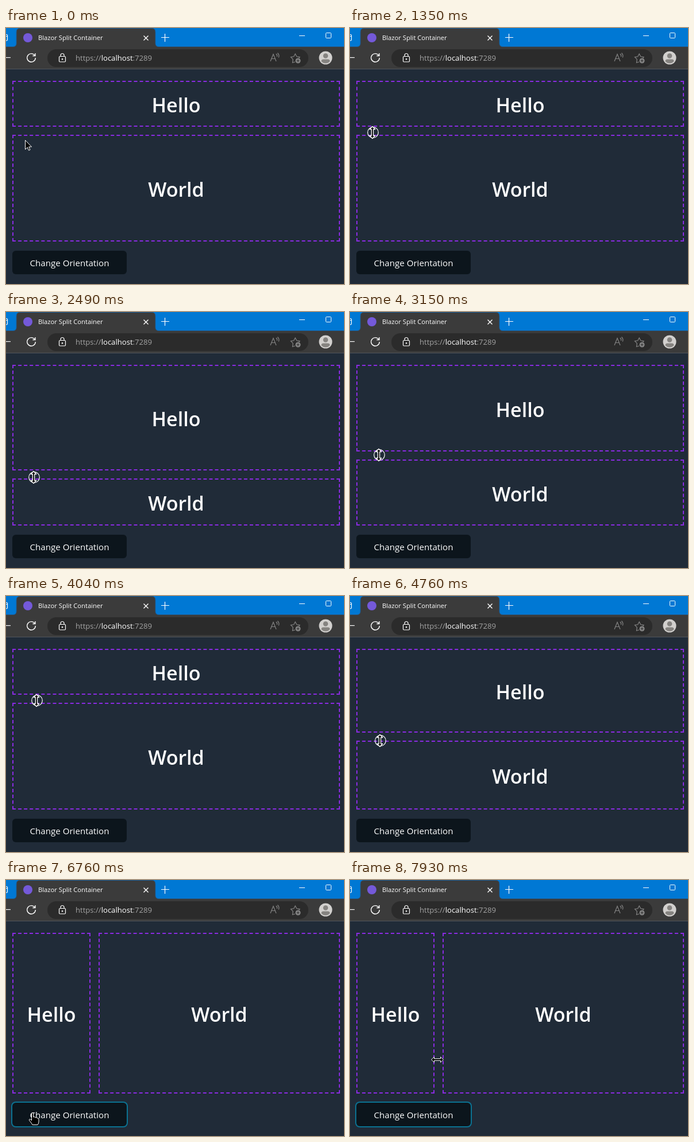
An HTML page that plays this animation: 588 by 446 pixels, repeating every 8 s.

```html
<!DOCTYPE html>
<html lang="en">
<head>
<meta charset="utf-8">
<title>Blazor Split Container</title>
<style>
  html, body { margin: 0; width: 100%; height: 100%; overflow: hidden; background: #202b38; }
  body { position: relative; font-family: "Open Sans", "Noto Sans", sans-serif; color: #fff; }
  svg { position: absolute; left: 0; top: 0; display: block; }
  .pane, #button { position: absolute; box-sizing: border-box; display: grid; place-items: center; line-height: 1; }
  .pane { border: 2px dashed blueviolet; padding-top: 4px; font-size: 34px; font-weight: 600; }
  #button {
    left: 11px; top: 388px; width: 199px; height: 41px; padding-top: 2px; border-radius: 6px;
    background: #0c151c; font-size: 15.1px; font-weight: 500; white-space: nowrap;
  }
</style>
</head>
<body>
<svg width="588" height="72" viewBox="0 0 588 72" fill="none">
  <rect width="588" height="34" fill="#0078d4"/>
  <rect y="33" width="588" height="39" fill="#3b3b3b"/>
  <path d="M-1 32.500H12Q18 32.500 18 27V7Q18 .5 24 .5H254Q260 .5 260 7V27Q260 32.500 266 32.500H589V34H-1Z" fill="#3b3b3b" stroke="#1c5f99"/>
  <rect y="33" width="588" height="2" fill="#3b3b3b"/>
  <path d="M0 71.500H588" stroke="#50565c"/>
  <rect x="72" y="37" width="454" height="31" rx="15.500" fill="#2b2b2b"/>
  <circle cx="38" cy="17" r="8" fill="#7459d9"/>
  <g stroke="#fff" stroke-width="1.2">
    <path d="M0 11.500H1Q2.500 11.500 2.500 13V20Q2.500 22 1 22H0M0 14.500H2"/>
    <path d="M239.500 13.500L247.500 21.500M247.500 13.500L239.500 21.500" stroke-width="1.4"/>
    <path d="M270 16.500H284M276.500 10V24"/>
    <path d="M510 13.500H520" stroke-width="1"/>
    <rect x="556.500" y="8.500" width="9" height="9" rx="1" stroke-width="1"/>
    <path d="M0 51.500H8"/>
    <path d="M50.300 48.200A7.300 7.300 0 1 0 51.300 52M50.900 44V48.500H46.400" stroke-width="1.4"/>
    <rect x="92.500" y="49.500" width="11" height="9.500" rx="1.500"/>
    <path d="M95 49.500V47.500A3 3 0 0 1 101 47.500V49.500"/>
  </g>
  <circle cx="98" cy="54.300" r="1.200" fill="#fff"/>
  <g stroke="#858585" stroke-width="1.2">
    <path d="M460 58L465 45.500L470 58M462 53.500H468M470 45Q472.300 47.200 471.500 50M472.500 43.500Q476 47 474.300 51.500"/>
    <path d="M503 59L498.500 60.500L499.300 54.700L495.500 50.700L500.700 49.800L503.200 45L505.700 49.800L511 50.700L509.500 52.500"/>
  </g>
  <circle cx="508" cy="57" r="4.500" fill="#858585"/>
  <path d="M505.500 57H510.500M508 54.500V59.500" stroke="#2b2b2b"/>
  <circle cx="556" cy="52" r="11.500" fill="#d2d0ce"/>
  <circle cx="556" cy="48.500" r="4.300" fill="#858380"/>
  <path d="M548.500 58Q548.500 54.500 552 54.500H560Q563.500 54.500 563.500 58Q560.500 61.500 556 61.500T548.500 58Z" fill="#858380"/>
  <text x="56" y="21" font-size="11.2" font-weight="500" fill="#fff">Blazor Split Container</text>
  <text x="121" y="57" font-size="13.1" fill="#a3a3a3">https://<tspan fill="#fff" font-weight="500">localhost</tspan>:7289</text>
</svg>

<div class="pane" id="first">Hello</div>
<div class="pane" id="second">World</div>
<div id="button">Change Orientation</div>

<svg width="588" height="446" viewBox="0 0 588 446">
  <defs>
    <path id="double-arrow" d="M-10.500 0L-5.500 -4.700V-1.600H5.500V-4.700L10.500 0L5.500 4.700V1.600H-5.500V4.700Z"/>
  </defs>
  <g id="cursor" fill="#000" stroke="#fff" stroke-linejoin="round">
    <path data-kind="arrow" d="M.5 .5V16.500L4.200 13L6.600 18.200L9 17.100L6.700 12H11.500Z"/>
    <g data-kind="rows">
      <circle r="9.300" fill="none" stroke-width="1.2"/>
      <use href="#double-arrow" transform="translate(-1 0) rotate(90)" stroke-width="1.3"/>
    </g>
    <use data-kind="columns" href="#double-arrow"/>
    <path data-kind="hand" d="M-1.500 13V1Q-1.500 -.5 0 -.5T1.500 1V7Q4.500 5.500 5 8Q8 6.700 8.300 9Q11 8 11 11V15Q11 18 9 20.500H0Q-1 18 -5 13.500Q-6.500 11.500 -5 10.700T-1.500 13Z"/>
  </g>
</svg>

<script>
const LOOP = 8000;
const TOP = 92, BOTTOM = 372, GAP = 14, MIN_HEIGHT = 80;
const GRAB_AT = 1350, DROP_AT = 5650;
const PRESS_AT = 6550, RELEASE_AT = 6660, FLIP_AT = 6700;
const GRIP = 10, LAG = 30;

const home = { x: 33, y: 195 };
const moves = [
  { start: 620, end: 1000, x: 34, y: 172, power: 1 },
  { start: GRAB_AT - 1, end: GRAB_AT, x: 40, y: 182, power: 1 },
  { start: 1530, end: 2610, x: 49, y: 292, power: 1.5 },
  { start: 2820, end: 4040, x: 54, y: 182, power: 1.57 },
  { start: 4400, end: 5500, x: 52, y: 299, power: 2.3 },
  { start: DROP_AT, end: 6430, x: 46, y: 406, power: 0.9 },
  { start: 6930, end: 7690, x: 145, y: 317, power: 1.5 },
  { start: 7750, end: 7930, x: 152, y: 313, power: 1 }
];

const byId = id => document.getElementById(id);
const clamp = (value, low, high) => Math.min(high, Math.max(low, value));
const ramp = (t, start, end) => clamp((t - start) / (end - start), 0, 1);
const easeOut = (u, power) => 1 - (1 - u) ** power;

function pointerAt(t) {
  let { x, y } = home;
  for (const move of moves) {
    const done = easeOut(ramp(t, move.start, move.end), move.power);
    x += (move.x - x) * done;
    y += (move.y - y) * done;
  }
  return { x: Math.round(x), y: Math.round(y) };
}

// The divider trails the dragging pointer and stops at the smallest pane.
function splitAt(t) {
  const low = TOP + MIN_HEIGHT, high = BOTTOM - MIN_HEIGHT - GAP;
  if (t < GRAB_AT + LAG) return low;
  return clamp(pointerAt(Math.min(t, DROP_AT) - LAG).y - GRIP, low, high);
}

function place(id, left, top, right, bottom) {
  Object.assign(byId(id).style, {
    left: left + "px", top: top + "px",
    width: right - left + "px", height: bottom - top + "px"
  });
}

function drawPanes(t) {
  const left = 11, right = 581;
  if (t < FLIP_AT) {
    const split = splitAt(t);
    place("first", left, TOP, right, split);
    place("second", left, split + GAP, right, BOTTOM);
  } else {
    const split = 147;
    place("first", left, TOP, split, BOTTOM);
    place("second", split + GAP, TOP, right, BOTTOM);
  }
}

function drawButton(t) {
  const focus = ramp(t, PRESS_AT, PRESS_AT + 100);
  const push = 2 * (focus - ramp(t, RELEASE_AT, RELEASE_AT + 100));
  const style = byId("button").style;
  style.boxShadow = `0 0 0 ${2 * focus}px rgba(0, 150, 191, ${0.67 * focus})`;
  style.transform = push ? `translateY(${push}px)` : "none";
}

function cursorKind(t, y) {
  if (t >= GRAB_AT && t < DROP_AT) return "rows";
  if (t >= 7750) return "columns";
  return y >= 388 ? "hand" : "arrow";
}

function drawCursor(t) {
  const { x, y } = pointerAt(t);
  const kind = cursorKind(t, y);
  const cursor = byId("cursor");
  cursor.setAttribute("transform", `translate(${x} ${y})`);
  for (const shape of cursor.children) {
    shape.style.display = shape.dataset.kind === kind ? "" : "none";
  }
}

const startTime = performance.now();
function tick() {
  const t = (performance.now() - startTime) % LOOP;
  drawPanes(t);
  drawButton(t);
  drawCursor(t);
  requestAnimationFrame(tick);
}
tick();
</script>
</body>
</html>
```
